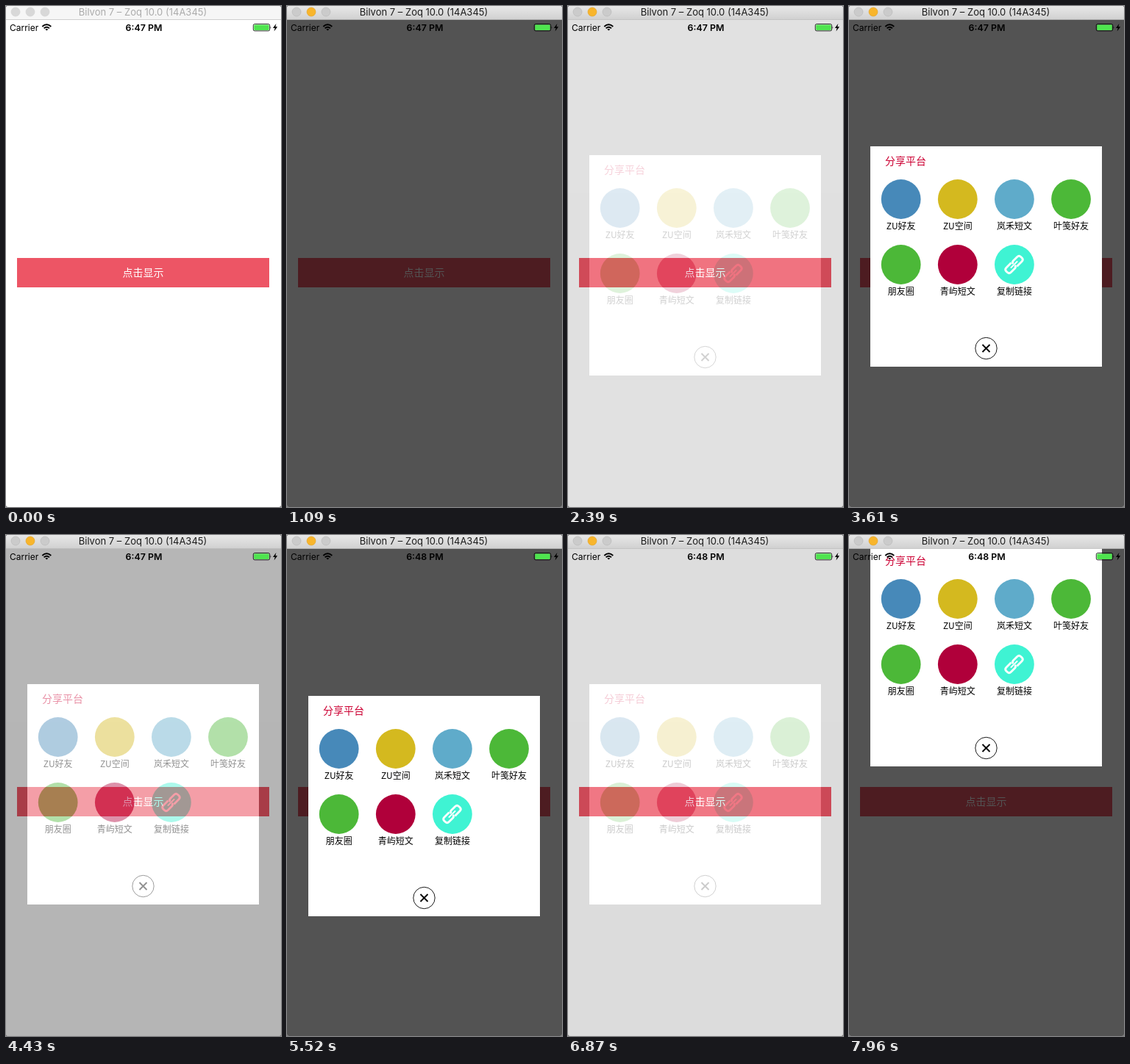
Recreate the animation shown at these times as an HTML page. Size 374 by 682 pixels, loop 8 s.

```html
<!DOCTYPE html>
<html lang="zh-CN">
<head>
<meta charset="utf-8">
<title>Share sheet</title>
<style>
  html, body { margin: 0; width: 100%; height: 100%; overflow: hidden; background: #777; }
  svg { display: block; width: 374px; height: 682px; }
  text { font-family: "Noto Sans CJK SC", "Noto Sans CJK", sans-serif; }
  .latin { font-family: Inter, sans-serif; }
  .mid { text-anchor: middle; }
  .label { font-size: 12px; font-weight: 500; text-anchor: middle; }
</style>
</head>
<body>
<svg viewBox="0 0 374 682" xmlns="http://www.w3.org/2000/svg">
  <defs>
    <linearGradient id="chrome" x2="0" y2="1">
      <stop stop-color="#e8e8e8"/><stop offset="1" stop-color="#d0d0d0"/>
    </linearGradient>
    <clipPath id="window"><path d="M0 3Q0 0 3 0H371Q374 0 374 3V679Q374 682 371 682H3Q0 682 0 679Z"/></clipPath>
  </defs>
  <g clip-path="url(#window)">
    <rect width="374" height="682" fill="#fff"/>
    <rect x="15" y="343" width="343" height="40" fill="#ed5565"/>
    <text class="mid" x="186.5" y="367.8" font-size="14" font-weight="300" fill="#fff">点击显示</text>

    <g id="sheet">
      <rect y="18" width="374" height="664" fill="#000" fill-opacity=".676"/>
      <g id="panel">
        <rect width="315" height="300" fill="#fff"/>
        <text x="20" y="25" font-size="14" font-weight="500" fill="#cc0033">分享平台</text>
        <g id="items"></g>
        <g transform="translate(195.5 161) rotate(-45)" fill="none" stroke="#fff" stroke-width="2.8">
          <path d="M-1 -4.5H-10.5Q-14 -4.5 -14 -1V1Q-14 4.5 -10.5 4.5H-3Q0 4.5 0 1.5"/>
          <path d="M1 4.5H10.5Q14 4.5 14 1V-1Q14 -4.5 10.5 -4.5H3Q0 -4.5 0 -1.5"/>
          <path d="M-6.5 0H6.5" stroke-width="2"/>
        </g>
        <g transform="translate(157.5 275)" fill="none" stroke="#000">
          <circle r="14.7" stroke-width=".9"/>
          <path d="M-5 -5L5 5M5 -5L-5 5" stroke-width="1.9"/>
        </g>
      </g>
    </g>

    <g id="status">
      <text class="latin" x="5" y="33.7" font-size="12">Carrier</text>
      <g transform="translate(55.3 33.4)" fill="none" stroke="#000" stroke-width="1.9">
        <path d="M-6 -5.4Q0 -11 6 -5.4M-3.7 -3Q0 -6.4 3.7 -3"/>
        <path d="M0 .2L-2 -1.7Q0 -3.3 2 -1.7Z" fill="#000" stroke="none"/>
      </g>
      <text id="clock" class="latin mid" x="187.5" y="33.7" font-size="12.4" font-weight="600"></text>
      <rect x="336.3" y="24.5" width="22.4" height="9.4" rx="2" fill="none" stroke="#000" stroke-width=".8"/>
      <rect x="337.3" y="25.5" width="20.4" height="7.4" rx="1" fill="#4fe44f"/>
      <path d="M359.6 27.4Q361.2 29.2 359.6 31Z"/>
      <path d="M367.4 24L363 30H365.7L364.6 34.4L369.2 28.2H366.4Z"/>
    </g>

    <g id="titlebar">
      <rect id="bar" width="374" height="18.5"/>
      <rect y="18" width="374" height="1" fill="#bcbcbc" fill-opacity=".7"/>
      <circle class="dot" cx="13" cy="8" r="6"/>
      <circle class="dot" cx="33" cy="8" r="6"/>
      <circle class="dot" cx="53" cy="8" r="6"/>
      <text id="caption" class="latin mid" x="186" y="13" font-size="13">Bilvon 7 – Zoq 10.0 (14A345)</text>
    </g>
  </g>
</svg>
<script>
  const LOOP = 8000, ACTIVATE = 930, MINUTE = 4500;
  const REST_X = 29, REST_Y = 203, DROP = 667, FADE = 300;
  const shows = [
    { start: 1050, hide: 2180 },
    { start: 3139, hide: 4270 },
    { start: 5112, hide: 6666 },
    { start: 7837, hide: Infinity },
  ];
  const items = [
    ["ZU好友", "#4789b9"], ["ZU空间", "#d4b91f"], ["岚禾短文", "#5fabca"], ["叶笺好友", "#4cb838"],
    ["朋友圈", "#4cb838"], ["青屿短文", "#b0003a"], ["复制链接", "#3ff3d3"],
  ];
  const $ = id => document.getElementById(id);
  const dots = [...document.querySelectorAll(".dot")];

  $("items").innerHTML = items.map(([name, color], i) => {
    const x = 41.7 + (i % 4) * 77.1, y = 72 + Math.floor(i / 4) * 89;
    return `<circle cx="${x}" cy="${y}" r="26.9" fill="${color}"/>
      <text class="label" x="${x}" y="${y + 41.2}">${name}</text>`;
  }).join("");

  // Offset from rest of a spring with damping ratio 0.5 settling in about one second.
  function springOffset(ms) {
    const omega = 13.8, ratio = 0.5, root = Math.sqrt(1 - ratio * ratio);
    const angle = omega * root * ms / 1000;
    const decay = Math.exp(-angle * ratio / root);
    return -DROP * decay * (Math.cos(angle) + ratio / root * Math.sin(angle));
  }

  const easeInOut = p => p < 0.5 ? 2 * p * p : 1 - 2 * (1 - p) ** 2;
  const clamp = p => Math.min(1, Math.max(0, p));

  function drawSheet(t) {
    const show = shows.find(s => t >= s.start && t < s.hide + FADE);
    $("sheet").setAttribute("visibility", show ? "visible" : "hidden");
    if (!show) return;
    const y = Math.round(REST_Y + springOffset(t - show.start));
    $("panel").setAttribute("transform", `translate(${REST_X} ${y})`);
    $("sheet").setAttribute("opacity", 1 - easeInOut(clamp((t - show.hide) / FADE)));
  }

  function drawChrome(t) {
    const active = t >= ACTIVATE;
    $("bar").setAttribute("fill", active ? "url(#chrome)" : "#f6f6f6");
    $("caption").setAttribute("fill", active ? "#1c1c1c" : "#ababab");
    dots.forEach((dot, i) => {
      const yellow = active && i === 1;
      dot.setAttribute("fill", yellow ? "#f8b52c" : active ? "#cbcbcb" : "#d8d8d8");
      dot.setAttribute("stroke", yellow ? "#dfa023" : active ? "#b5b5b5" : "#d0d0d0");
      dot.setAttribute("stroke-width", 0.6);
    });
    $("clock").textContent = t < MINUTE ? "6:47 PM" : "6:48 PM";
  }

  function frame() {
    const t = performance.now() % LOOP;
    drawSheet(t);
    drawChrome(t);
    requestAnimationFrame(frame);
  }
  frame();
</script>
</body>
</html>
```
